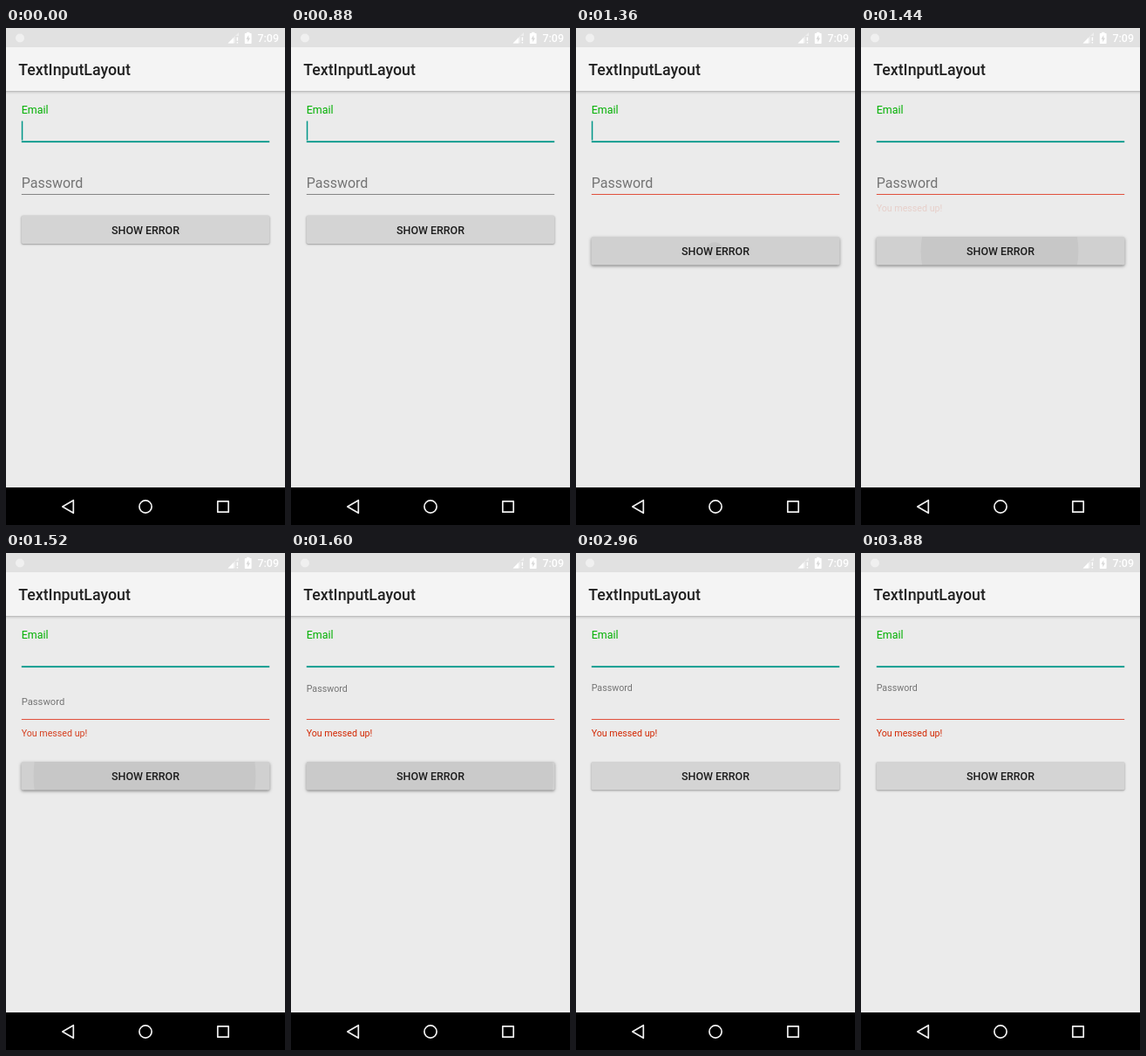
Write an HTML page with a canvas that moves like this. It is 320 by 569 pixels and loops after 3.92 s.

```html
<!DOCTYPE html>
<html lang="en">
<head>
<meta charset="utf-8">
<title>TextInputLayout</title>
<style>
html, body { margin: 0; width: 100%; height: 100%; overflow: hidden; background: #ebebeb; }
canvas { display: block; width: 320px; height: 569px; }
</style>
</head>
<body>
<canvas id="stage"></canvas>
<script>
const W = 320, H = 569, LOOP = 3920;
const canvas = document.getElementById('stage');
const ctx = canvas.getContext('2d');
const dpr = window.devicePixelRatio || 1;
canvas.width = W * dpr;
canvas.height = H * dpr;

const TEAL = '#009688', RED = '#d32803', HINT = '#747474';
const CURSOR_ON = [[0, 240], [880, 1440], [2040, 2600], [3240, 3840]];

const lerp = (a, b, p) => a + (b - a) * p;
const span = (t, a, b) => Math.min(1, Math.max(0, (t - a) / (b - a)));

// Material standard curve: cubic-bezier(.4, 0, .2, 1)
function ease(x) {
  let lo = 0, hi = 1;
  for (let i = 0; i < 24; i++) {
    const s = (lo + hi) / 2, r = 1 - s;
    if (1.2 * r * r * s + 0.6 * r * s * s + s * s * s < x) lo = s; else hi = s;
  }
  return lo * lo * (3 - 2 * lo);
}

function rect(x, y, w, h, color) {
  ctx.fillStyle = color;
  ctx.fillRect(x, y, w, h);
}

function text(str, x, y, size, color, weight = 400, align = 'left') {
  ctx.font = `${weight} ${size}px Roboto, sans-serif`;
  ctx.textAlign = align;
  ctx.fillStyle = color;
  ctx.fillText(str, x, y);
}

function poly(points) {
  ctx.beginPath();
  points.forEach(([x, y]) => ctx.lineTo(x, y));
  ctx.closePath();
}

function roundRect(x, y, w, h, r) {
  ctx.beginPath();
  ctx.moveTo(x + r, y);
  ctx.arcTo(x + w, y, x + w, y + h, r);
  ctx.arcTo(x + w, y + h, x, y + h, r);
  ctx.arcTo(x, y + h, x, y, r);
  ctx.arcTo(x, y, x + w, y, r);
  ctx.closePath();
}

function statusBar() {
  rect(0, 0, W, 22, '#e1e1e1');
  ctx.fillStyle = '#f0f0f0';
  ctx.beginPath();
  ctx.arc(16, 11.5, 5, 0, 7);
  ctx.fill();

  // signal
  poly([[254.5, 17.5], [267, 5], [267, 9], [263, 9], [263, 17.5]]);
  ctx.fillStyle = '#eeeeee';
  ctx.fill();
  poly([[254.5, 17.5], [261, 11], [261, 17.5]]);
  ctx.fillStyle = '#fff';
  ctx.fill();
  rect(264.6, 10.5, 1.5, 4.2, '#fff');
  rect(264.6, 16, 1.5, 1.5, '#fff');

  // battery
  rect(276, 4.8, 3.4, 2, '#fff');
  roundRect(273.8, 6, 7.8, 12, 0.8);
  ctx.fill();
  poly([[278.3, 8], [275.5, 12.8], [277.2, 12.8], [277.2, 16.2], [280, 11.4], [278.3, 11.4]]);
  ctx.fillStyle = '#d8d8d8';
  ctx.fill();

  text('7:09', 313, 16, 12.44, '#fff', 500, 'right');
}

function appBar() {
  const g = ctx.createLinearGradient(0, 72, 0, 76);
  g.addColorStop(0, 'rgba(0,0,0,.24)');
  g.addColorStop(0.4, 'rgba(0,0,0,.09)');
  g.addColorStop(1, 'rgba(0,0,0,0)');
  rect(0, 72, W, 4, g);
  rect(0, 22, W, 50, '#f4f4f4');
  text('TextInputLayout', 14.2, 54, 17.78, '#202020', 500);
}

function navBar() {
  rect(0, 526, W, 43, '#000');
  ctx.strokeStyle = '#f0f0f0';
  ctx.lineWidth = 1.7;
  ctx.lineJoin = 'round';
  poly([[64.8, 548], [77.3, 540.7], [77.3, 555.3]]);
  ctx.stroke();
  ctx.beginPath();
  ctx.arc(160, 548, 7.1, 0, 7);
  ctx.stroke();
  ctx.strokeRect(242.8, 541.8, 12.4, 12.4);
}

function button(t, y) {
  const x = 17.5, w = 285, h = 32.3;
  const lift = span(t, 1240, 1340) * (1 - span(t, 1560, 1720));
  ctx.save();
  ctx.shadowColor = `rgba(0,0,0,${0.34 + 0.08 * lift})`;
  ctx.shadowBlur = (2 + 1.5 * lift) * dpr;
  ctx.shadowOffsetY = (1 + 0.5 * lift) * dpr;
  roundRect(x, y, w, h, 1.8);
  ctx.fillStyle = '#d4d4d4';
  ctx.fill();
  ctx.restore();

  if (lift > 0) {
    const fade = 1 - span(t, 1540, 1720);
    const grow = Math.sqrt(span(t, 1360, 1560));
    ctx.save();
    roundRect(x, y, w, h, 1.8);
    ctx.clip();
    rect(x, y, w, h, `rgba(0,0,0,${0.02 * lift})`);
    ctx.beginPath();
    ctx.arc(159, y + h / 2, 142 * grow, 0, 7);
    ctx.fillStyle = `rgba(0,0,0,${0.045 * fade})`;
    ctx.fill();
    ctx.restore();
  }
  text('SHOW ERROR', 160, y + 21, 12.44, '#1c1c1c', 500, 'center');
}

function emailField(t) {
  text('Email', 17.7, 98, 12.44, '#00b000');
  rect(17.8, 129.3, 284.4, 1.8, TEAL);
  if (CURSOR_ON.some(([a, b]) => t >= a && t < b)) rect(17.8, 106.5, 1.5, 22, TEAL);
}

function passwordField(t, failed) {
  const f = ease(span(t, 1440, 1640));
  text('Password', 17.7, lerp(183.3, 158.3, f * f), lerp(16, 10.67, ease(f)), HINT);
  rect(17.8, 190, 284.4, 1, failed ? '#e0503c' : '#858585');
  ctx.globalAlpha = ease(span(t, 1400, 1600));
  text('You messed up!', 17.7, 210, 10.67, RED);
  ctx.globalAlpha = 1;
}

function draw(t) {
  const failed = t >= 1360;
  ctx.setTransform(dpr, 0, 0, dpr, 0, 0);
  rect(0, 0, W, H, '#ebebeb');
  statusBar();
  appBar();
  emailField(t);
  passwordField(t, failed);
  button(t, failed ? 239 : 214.6);
  navBar();
}

const start = performance.now();
function frame() {
  draw((performance.now() - start) % LOOP);
  requestAnimationFrame(frame);
}
frame();
</script>
</body>
</html>
```
